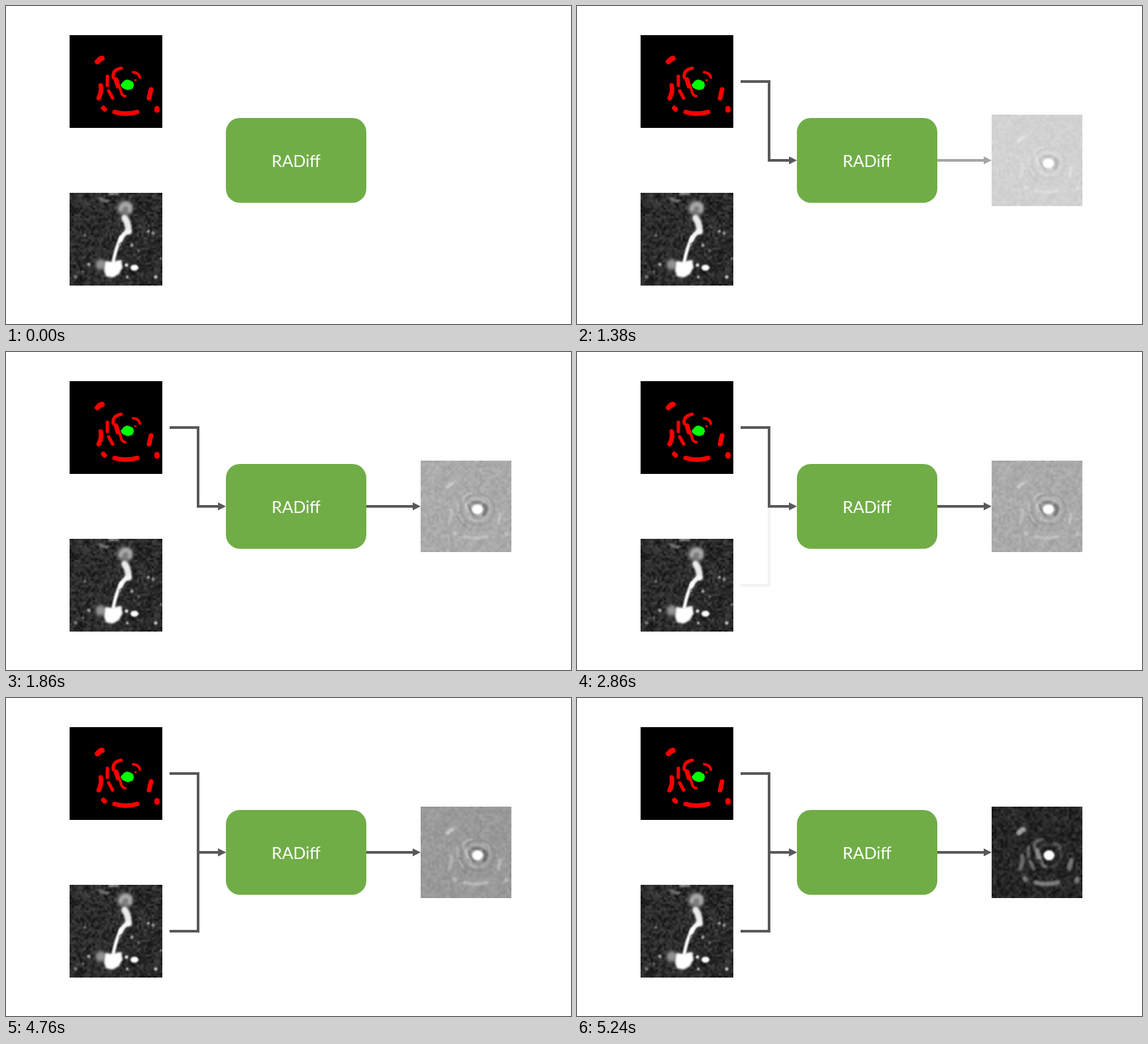
An HTML page with a canvas for the animation above (8.32 s loop, 853 px wide and 480 px high).

```html
<!DOCTYPE html>
<html lang="en">
<head>
<meta charset="utf-8">
<title>RADiff</title>
<style>
  html, body { margin: 0; width: 100%; height: 100%; overflow: hidden; background: #fff; }
  canvas { display: block; }
</style>
</head>
<body>
<canvas id="stage" width="853" height="480"></canvas>
<script>
const ctx = document.getElementById('stage').getContext('2d');
const LOOP = 8320, STEP = 60, LINE = '#58595b';

let seed = 7;
const random = () => (seed = (seed * 16807) % 2147483647) / 2147483647;
const gray = (v, a = 1) => `rgba(${v},${v},${v},${a})`;

// Segmentation marks on a 140 x 140 grid: [line width, path, brightness in the generated map]
const marks = [
  [8, 'M42 40 L46 36 L49 35', 1],
  [5, 'M78 50 Q70 51 67 56 Q65 60 66 64', .55],
  [7, 'M70 67 L73 77', .8],
  [4, 'M75 78 Q77 81 78 87 Q80 92 84 92', .55],
  [5, 'M57 62 L57 76', .55],
  [7, 'M47 76 Q49 85 44 95', .55],
  [5, 'M59 84 L65 95', .6],
  [4, 'M96 56 Q105 57 106 64', .45],
  [3, 'M99 68 L100 68', .3],
  [7, 'M123 82 L120 95', .65],
  [7, 'M51 110 L53 112', .65],
  [7, 'M68 116 Q85 121 102 116', .7],
  [8, 'M132 111 L132 113', .65]
];

function buffer(width, height, paint) {
  const c = document.createElement('canvas');
  c.width = width;
  c.height = height;
  const g = c.getContext('2d');
  g.lineCap = g.lineJoin = 'round';
  paint(g);
  return c;
}

const picture = paint => buffer(140, 140, paint);

function noise(g, cells, mean, spread) {
  const grain = buffer(cells, cells, n => {
    for (let i = 0; i < cells * cells; i++) {
      n.fillStyle = gray(Math.round(mean + (random() + random() - 1) * spread));
      n.fillRect(i % cells, Math.floor(i / cells), 1, 1);
    }
  });
  g.drawImage(grain, 0, 0, 140, 140);
}

function stroke(g, width, path, color) {
  g.lineWidth = width;
  g.strokeStyle = color;
  g.stroke(new Path2D(path));
}

function fill(g, path, color) {
  g.fillStyle = color;
  g.fill(new Path2D(path));
}

function spot(g, x, y, rx, ry, color) {
  g.fillStyle = color;
  g.beginPath();
  g.ellipse(x, y, rx, ry, 0, 0, 7);
  g.fill();
}

const mask = picture(g => {
  g.fillRect(0, 0, 140, 140);
  for (const [width, path] of marks) stroke(g, width, path, '#f00');
  fill(g, 'M77 75 L82 69 L86 67 L91 68 L96 71 L97 76 L95 81 L88 83 L82 81 L79 79Z', '#0f0');
});

const galaxy = picture(g => {
  noise(g, 44, 43, 34);
  g.filter = 'blur(2.5px)';
  spot(g, 84, 23, 12, 12, gray(140, .8));
  spot(g, 47, 108, 8, 8, gray(160, .9));
  g.filter = 'blur(1.5px)';
  stroke(g, 4, 'M46 8 Q52 14 58 12', gray(150, .7));
  stroke(g, 4, 'M60 1 L73 1', gray(190, .7));
  stroke(g, 6, 'M77 25 Q79 17 86 17 Q93 19 91 27', gray(200, .6));
  stroke(g, 10, 'M83 38 Q89 46 89 58', gray(235));
  fill(g, 'M54 103 L65 104 L78 101 L80 113 L74 123 L65 128 L55 126 L52 117Z', '#fff');
  g.filter = 'blur(.8px)';
  stroke(g, 7, 'M89 58 Q81 61 77 71', gray(245));
  stroke(g, 5, 'M78 67 Q70 82 66 104', '#fff');
  spot(g, 98, 113, 6, 4.5, '#fff');
  for (const [x, y, r, v] of [
    [86, 109, 2.5, 240], [94, 79, 2.5, 170], [29, 108, 2.5, 170], [130, 127, 2.5, 210],
    [87, 127, 2, 200], [119, 58, 2, 190], [126, 61, 2.5, 150], [9, 127, 2.5, 130],
    [20, 119, 2, 110], [23, 64, 2, 130], [104, 87, 2, 120], [138, 99, 2, 140], [76, 78, 2, 150]
  ]) spot(g, x, y, r, r, gray(v));
});

const rings = [13, 19, 26].map(r => `M${88 - r} 75 a${r} ${r * .9} 0 1 1 ${2 * r} 0 a${r} ${r * .9} 0 1 1 ${-2 * r} 0`);

const coarse = picture(g => {
  noise(g, 40, 171, 18);
  g.filter = 'blur(1.2px)';
  rings.forEach((path, i) => stroke(g, 3, path, gray(i === 1 ? 205 : 135, .4)));
  for (const [width, path, level] of marks) stroke(g, width * .7, path, gray(215, level * .75));
  stroke(g, 5, 'M98 68 Q104 73 98 82', gray(105, .7));
  stroke(g, 4, 'M74 68 Q77 79 83 83 M80 64 L92 64', gray(115, .6));
  stroke(g, 3, 'M58 86 Q61 97 70 100', gray(130, .6));
  g.filter = 'blur(.8px)';
  spot(g, 87.5, 74.5, 8.5, 7.5, '#fff');
});

const refined = picture(g => {
  noise(g, 40, 39, 30);
  g.filter = 'blur(1.5px)';
  rings.forEach((path, i) => stroke(g, 3, path, gray(i === 1 ? 105 : 22, .5)));
  for (const [width, path, level] of marks) stroke(g, width, path, gray(185, level * .85));
  g.filter = 'blur(.8px)';
  spot(g, 88.5, 74.5, 8.3, 7.8, '#fff');
});

// Line and head share one buffer so their overlap fades as a single shape
const arrow = (path, tipX) => buffer(853, 480, g => {
  g.lineCap = 'butt';
  g.lineJoin = 'miter';
  stroke(g, 4, path, LINE);
  fill(g, `M${tipX} 233 l-12 -6 v12z`, LINE);
});

const topArrow = arrow('M247 114 H290 V233 H322', 332);
const bottomArrow = arrow('M247 352 H290 V233 H322', 332);
const outArrow = arrow('M544 233 H616', 626);

const overlay = image => ctx.drawImage(image, 0, 0);
const output = image => ctx.drawImage(image, 626, 164, 137, 138);

// Opacity advances once per STEP from the first visible change
function fade(t, start, duration, paint) {
  if (t < start) return;
  const elapsed = (Math.floor((t - start) / STEP) + 1) * STEP;
  ctx.globalAlpha = Math.min(1, elapsed / duration);
  paint();
  ctx.globalAlpha = 1;
}

function draw(t) {
  ctx.fillStyle = '#fff';
  ctx.fillRect(0, 0, 853, 480);
  ctx.drawImage(mask, 96, 44);
  ctx.drawImage(galaxy, 96, 282);

  fade(t, 120, 840, () => overlay(topArrow));
  fade(t, 960, 900, () => { overlay(outArrow); output(coarse); });
  fade(t, 2860, 900, () => overlay(bottomArrow));
  fade(t, 4760, 500, () => output(refined));

  ctx.fillStyle = '#70ad47';
  ctx.beginPath();
  ctx.roundRect(332, 169, 212, 128, 21);
  ctx.fill();
  ctx.fillStyle = '#fff';
  ctx.font = '25px Lato, sans-serif';
  ctx.textAlign = 'center';
  ctx.fillText('RADiff', 438, 243);
}

const begin = performance.now();
function tick() {
  draw((performance.now() - begin) % LOOP);
  requestAnimationFrame(tick);
}
tick();
</script>
</body>
</html>
```
